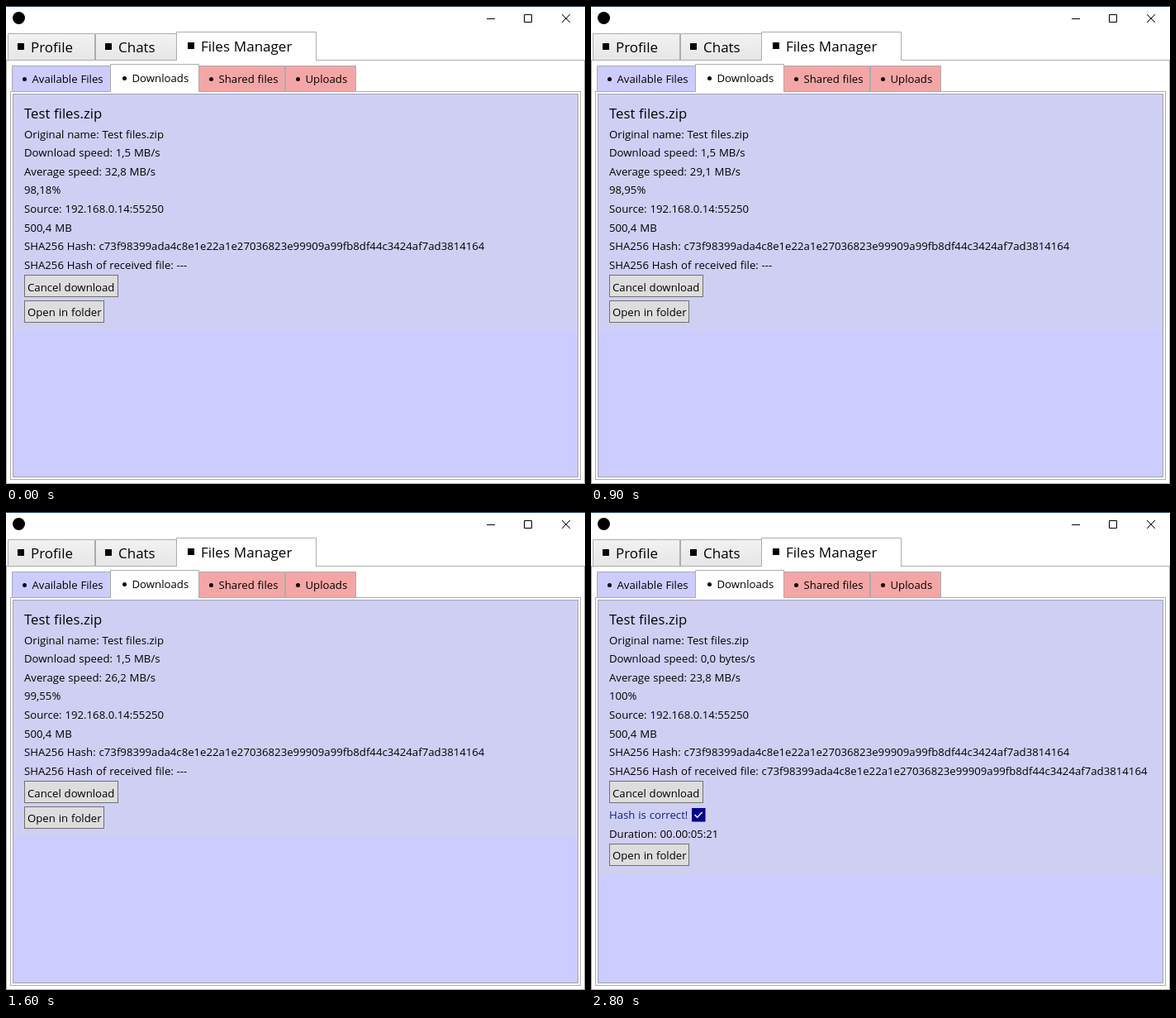
An HTML page for the animation above (4500 ms loop, 701 by 578 pixels).

```html
<!DOCTYPE html>
<html lang="en">
<head>
<meta charset="utf-8">
<title>Files Manager</title>
<style>
  html, body { margin: 0; width: 100%; height: 100%; overflow: hidden; background: #fff; }
  svg { display: block; }
  text { font: 13.2px "Open Sans", "Noto Sans", sans-serif; word-spacing: .4px; fill: #000; white-space: pre; }
  .big { font-size: 17px; }
  .title { font-size: 16.7px; }
  .note { fill: #0a1f85; }
  .edge { stroke: #acacac; }
  .icon { stroke: #000; fill: none; }
</style>
</head>
<body>
<svg id="stage" width="701" height="578" viewBox="0 0 701 578">
  <defs>
    <linearGradient id="grey" x2="0" y2="1">
      <stop stop-color="#f2f2f2"/><stop offset="1" stop-color="#e6e6e6"/>
    </linearGradient>
  </defs>
  <rect width="701" height="578" fill="#fff"/>
  <rect width="701" height="1" fill="#1f3a60"/>
  <circle cx="15.5" cy="14.5" r="7.5"/>
  <path class="icon" d="M582 15.5h10M627.5 10.5h9v9h-9zM673 10l10 10M683 10l-10 10"/>
  <rect class="edge" x=".5" y="65.5" width="700" height="512" fill="#fff"/>
  <rect class="edge" x="5.5" y="103.5" width="690" height="469" fill="#fff"/>
  <g id="tabs"></g>
  <rect x="8.5" y="106.5" width="684" height="463" fill="#ccf" stroke="#a2a2ac"/>
  <rect id="item" x="10.5" y="108.5" width="680" fill="#cfcff4"/>
  <g id="rows"></g>
  <g id="done">
    <text class="note" id="status" x="22" y="371"></text>
    <text x="22" y="394">Duration: 00.00:05:21</text>
    <g id="check">
      <rect x="122" y="358" width="16.5" height="16.5" fill="#00008b"/>
      <path d="M125.5 366l3.2 3.2 6-6.2" fill="none" stroke="#fff" stroke-width="1.4"/>
    </g>
  </g>
  <g>
    <rect x="22.5" y="325.5" width="113" height="26" fill="#ddd" stroke="#707070"/>
    <text x="26" y="345">Cancel download</text>
  </g>
  <g id="open">
    <rect x="22.5" y="356.5" width="96" height="26" fill="#ddd" stroke="#707070"/>
    <text x="26" y="375">Open in folder</text>
  </g>
</svg>
<script>
const $ = id => document.getElementById(id);
const LOOP = 4500, STEP = 100, FINISH = 2100, VERIFIED = 2800;
const HASH = "c73f98399ada4c8e1e22a1e27036823e99909a99fb8df44c3424af7ad3814164";

// [time, percent, average MB/s]
const progress = [
  [0, 98.18, 32.8], [500, 98.6, 30.8], [900, 98.95, 29.1],
  [1200, 99.2, 27.6], [1600, 99.55, 26.2], [FINISH, 100, 23.8]
];

function add(parent, tag, attrs, label = "") {
  const el = document.createElementNS("http://www.w3.org/2000/svg", tag);
  for (const name in attrs) el.setAttribute(name, attrs[name]);
  el.textContent = label;
  return parent.appendChild(el);
}

function tab(label, left, right, top, bottom, fill, active) {
  const g = $("tabs"), big = bottom < 70, lift = active ? 1 : 0;
  add(g, "path", {
    d: `M${left + .5} ${bottom + .5}V${top + .5}H${right + .5}V${bottom + .5}${active ? "" : "z"}`,
    fill, class: "edge"
  });
  if (active) add(g, "rect", { x: left + 1, y: bottom, width: right - left - 1, height: 1, fill });
  const x = left + (big ? (active ? 14 : 12) : (active ? 17 : 15));
  if (big) add(g, "rect", { x, y: 45 - lift, width: 8, height: 8 });
  else add(g, "circle", { cx: x + .5, cy: 88.5 - lift, r: 2.5 });
  add(g, "text", { x: x + (big ? 16 : 9.5), y: (big ? 56 : 93) - lift, class: big ? "big" : "" }, label);
}

tab("Profile", 2, 107, 33, 65, "url(#grey)");
tab("Chats", 108, 206, 33, 65, "url(#grey)");
tab("Files Manager", 206, 375, 31, 65, "#fff", true);
tab("Available Files", 7, 126, 72, 103, "#ccf");
tab("Shared files", 233, 337, 72, 103, "#f4a6a6");
tab("Uploads", 338, 423, 72, 103, "#f4a6a6");
tab("Downloads", 126, 233, 70, 103, "#fff", true);

add($("rows"), "text", { x: 22, y: 136, class: "title" }, "Test files.zip");
const rows = [160, 182, 205, 227, 250, 273, 295, 318].map(y => add($("rows"), "text", { x: 22, y }));

const comma = (value, digits) => value.toFixed(digits).replace(".", ",");

function measure(t) {
  if (t >= FINISH) return progress[progress.length - 1].slice(1);
  const i = progress.findIndex(p => p[0] > t);
  const a = progress[i - 1], b = progress[i];
  const k = (t - a[0]) / (b[0] - a[0]);
  return [1, 2].map(n => a[n] + (b[n] - a[n]) * k);
}

function draw(now) {
  const t = Math.floor(now % LOOP / STEP) * STEP;
  const finished = t >= FINISH, verified = t >= VERIFIED;
  const [percent, average] = measure(t);
  const speed = finished ? "0,0 bytes/s" : (t >= 400 && t < 700 ? "1,6" : "1,5") + " MB/s";
  [
    "Original name: Test files.zip",
    "Download speed: " + speed,
    `Average speed: ${comma(average, 1)} MB/s`,
    (finished ? "100" : comma(percent, 2)) + "%",
    "Source: 192.168.0.14:55250",
    "500,4 MB",
    "SHA256 Hash: " + HASH,
    "SHA256 Hash of received file: " + (verified ? HASH : "---")
  ].forEach((line, i) => rows[i].textContent = line);

  $("item").setAttribute("height", finished ? 328 : 283);
  $("item").setAttribute("stroke", finished ? "#d3d3d3" : "#d3d3ee");
  $("open").setAttribute("transform", `translate(0 ${finished ? 45 : 0})`);
  $("done").style.display = finished ? "" : "none";
  $("check").style.display = verified ? "" : "none";
  $("status").textContent = verified ? "Hash is correct!" : "Hash verification in progress...";
}

const start = performance.now();
function frame() {
  draw(performance.now() - start);
  requestAnimationFrame(frame);
}
frame();
</script>
</body>
</html>
```
